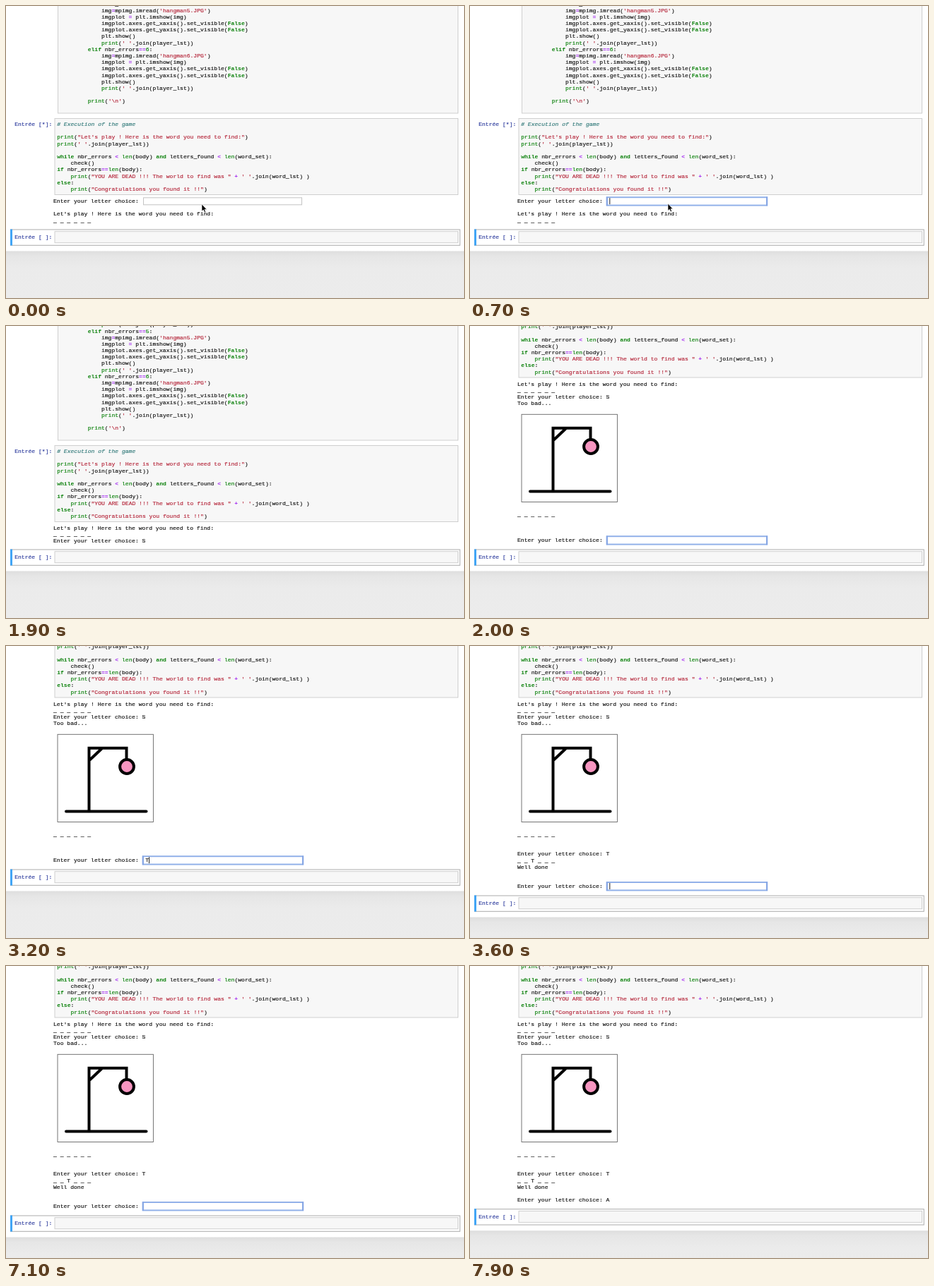
Recreate the animation shown at these times as an HTML page. Size 648 by 414 pixels, loop 8 s.

```html
<!DOCTYPE html>
<html lang="fr">
<head>
<meta charset="utf-8">
<title>Hangman notebook</title>
<style>
html, body { margin: 0; width: 100%; height: 100%; overflow: hidden; background: #fff; }
svg { display: block; width: 648px; height: 414px; }
text {
  font: 8.055px "Liberation Mono", "Courier New", monospace;
  white-space: pre; fill: #141414; stroke: #141414; stroke-width: .18px;
}
.comment { fill: #357c7c; stroke: #357c7c; font-style: italic; }
.string { fill: #b5263a; stroke: #b5263a; }
.keyword { fill: #0a800a; stroke: none; font-weight: bold; }
.builtin, .number { fill: #0a800a; stroke: #0a800a; }
.operator { fill: #a22af0; stroke: none; font-weight: bold; }
.prompt { fill: #303f9f; stroke: #303f9f; }
</style>
</head>
<body>
<svg id="stage" viewBox="0 0 648 414"></svg>
<script>
const LOOP = 8000, LINE = 9.19;
const ASK = 'Enter your letter choice: ';
const BLANKS = '_ _ _ _ _ _';

const branch = n => String.raw`        elif nbr_errors==${n}:
            img=mpimg.imread('hangman${n}.JPG')
            imgplot = plt.imshow(img)
            imgplot.axes.get_xaxis().set_visible(False)
            imgplot.axes.get_yaxis().set_visible(False)
            plt.show()
            print(' '.join(player_lst))
`;
const checkCode = "            print(' '.join(player_lst))\n" + branch(5) + branch(6) +
  String.raw`
        print('\n')`;
const gameCode = `# Execution of the game

print("Let's play ! Here is the word you need to find:")
print(' '.join(player_lst))

while nbr_errors < len(body) and letters_found < len(word_set):
    check()
if nbr_errors==len(body):
    print("YOU ARE DEAD !!! The world to find was " + ' '.join(word_lst) )
else:
    print("Congratulations you found it !!")`;

const KINDS = ['comment', 'string', 'keyword', 'builtin', 'operator', 'number'];
const TOKEN = /(#.*)|('[^']*'|"[^"]*")|\b(while|and|if|elif|else|False)\b|\b(print|len)\b|(==|[=<+])|\b(\d+)/g;

const escape = s => s.replace(/</g, '&lt;');
const text = (x, y, s, cls = '') => `<text x="${x}" y="${y}" class="${cls}">${s}</text>`;
const rect = (x, y, w, h, fill, stroke = 'none', sw = 1) =>
  `<rect x="${x}" y="${y}" width="${w}" height="${h}" fill="${fill}" stroke="${stroke}" stroke-width="${sw}"/>`;
const group = (x, y, s) => `<g transform="translate(${x} ${y})">${s}</g>`;

const highlight = line => line.replace(TOKEN, (token, ...parts) => {
  const kind = KINDS[parts.findIndex((p, i) => i < KINDS.length && p)];
  return `<tspan class="${kind}">${escape(token)}</tspan>`;
});

const code = (x, y, src) =>
  src.split('\n').map((line, i) => text(x, y + i * LINE, highlight(line))).join('');

const notebook =
  rect(73.5, -40, 566, 192, '#f7f7f7', '#cfcfcf') + code(77, -9.7, checkCode) +
  rect(69, 159.5, 570.5, 108, '#f7f7f7', '#cfcfcf') + code(72.2, 170.1, gameCode) +
  text(12.2, 170.1, 'Entrée [*]:', 'prompt');

const nextCell =
  rect(6.5, 317, 635.7, 22.3, '#fff', '#ababab') + rect(6, 316.5, 3, 23, '#42a5f5') +
  rect(69, 319.7, 570.5, 16, '#f7f7f7', '#cfcfcf') +
  text(12.2, 330.3, 'Entrée [ ]:', 'prompt') +
  rect(0, 347.5, 648, 120, 'url(#floor)');

const defs = `<defs><linearGradient id="floor" x2="0" y2="1">
  <stop offset="0" stop-color="#dedede"/><stop offset=".06" stop-color="#e6e6e6"/>
  <stop offset=".2" stop-color="#ebebeb"/><stop offset="1" stop-color="#ededed"/>
</linearGradient></defs>`;

const gallows = rect(73, 125.3, 135.4, 124.2, '#fff', '#666', .9) +
  `<g fill="none" stroke="#000" stroke-width="4" stroke-linecap="round">
    <path d="M85 234.5H198.5M117.5 234V144.7H170.5V160M118.5 161.5L135 146"/>
    <circle cx="171" cy="171" r="9.9" fill="#f695c0"/></g>`;

const arrow = (x, y) => group(x, y,
  '<path d="M0 0V10L2.3 8L3.9 11.6L5.6 10.8L4 7.4H7Z" fill="#000" stroke="#fff" stroke-width=".6"/>');

// Input row whose text baseline is y
function field(y, value, focus, caret) {
  const box = focus
    ? rect(193.8, y - 8, 226.4, 11.4, '#fff', '#92b1e9', 2) +
      rect(192.8, y - 8.6, 2, 12.6, '#86a6e4') + rect(419, y - 8.6, 2, 12.6, '#86a6e4')
    : rect(194.5, y - 7.4, 224, 10, '#fff', '#c4c4c4');
  const bar = caret ? rect(value ? 202 : 197.3, y - 7, 1, 9, '#222') : '';
  return text(67, y, ASK) + box + text(197.3, y, value) + bar;
}

const intro = y => text(67, y, "Let's play ! Here is the word you need to find:") +
  text(67, y + LINE, BLANKS);

const firstRound = group(0, -194.5, notebook) + intro(84.5) +
  text(67, 102.9, ASK + 'S') + text(67, 112, 'Too bad...') +
  gallows + text(67, 269.8, BLANKS);

const secondRound = firstRound + text(67, 297.4, ASK + 'T') +
  text(67, 306.6, '_ _ T _ _ _') + text(67, 315.8, 'Well done');

const blink = (t, start) => t >= start && Math.floor((t - start) / 500) % 2 === 0;

function scene(t) {
  if (t < 1900) {
    const k = Math.min(1, Math.max(0, (t - 100) / 800));
    const typed = t >= 1700;
    return notebook + field(279.2, typed ? 'S' : '', t >= 600, typed || blink(t, 600)) +
      intro(297.4) + nextCell + (typed ? '' : arrow(277 + 4 * k, 281 - k));
  }
  if (t < 2000)
    return group(0, 10, notebook) + intro(288.6) + text(67, 307, ASK + 'S') + nextCell;
  if (t < 3600) {
    const typed = t >= 3200;
    return firstRound + field(306.2, typed ? 'T' : '', true, typed || blink(t, 2400)) + nextCell;
  }
  if (t < 7900) {
    const typed = t >= 7700;
    return secondRound + field(343, typed ? 'A' : '', true, typed || blink(t, 3600)) +
      group(0, 37, nextCell);
  }
  return secondRound + text(67, 334, ASK + 'A') + group(0, 27.7, nextCell);
}

const stage = document.getElementById('stage');
const start = performance.now();
let shown = '';
function draw() {
  const next = scene((performance.now() - start) % LOOP);
  if (next !== shown) stage.innerHTML = defs + (shown = next);
  requestAnimationFrame(draw);
}
draw();
</script>
</body>
</html>
```
